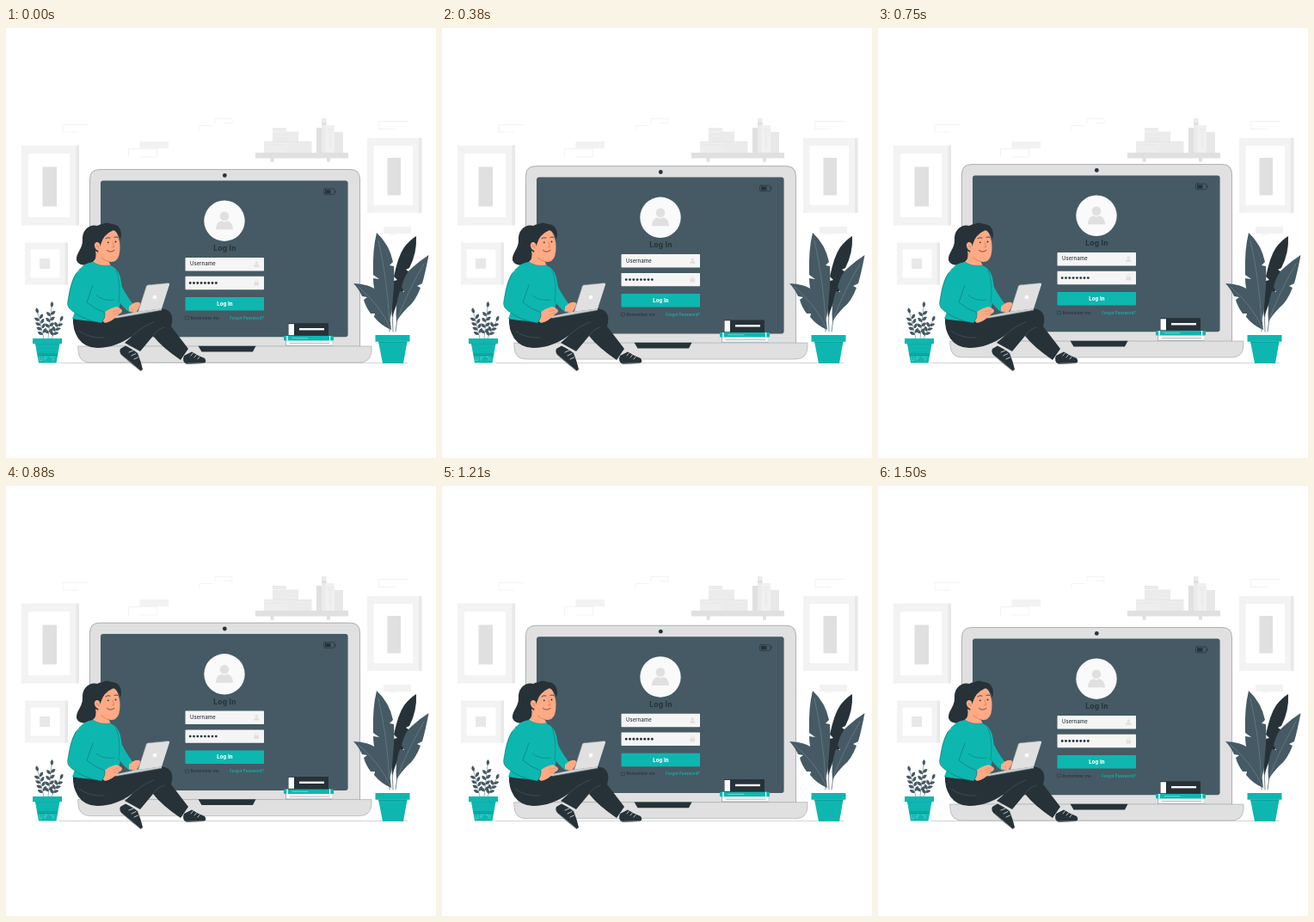
An HTML page with a canvas for the animation above (1.54 s loop, 500 px wide and 500 px high).

```html
<!DOCTYPE html>
<html lang="en">
<head>
<meta charset="utf-8">
<title>Log in</title>
<style>
html, body { margin: 0; width: 100%; height: 100%; overflow: hidden; background: #fff; }
canvas { display: block; width: 500px; height: 500px; }
</style>
</head>
<body>
<canvas id="stage"></canvas>
<script>
const LOOP = 1540, RISE_END = 690, FALL_END = 1510, LIFT = 6;
const TEAL = '#0db7b0', DARK = '#263238', SLATE = '#455a64', SKIN = '#fdaa85';
const GREY = '#e0e0e0', PALE = '#f0f0f0', LIGHT = '#fafafa', FIELD = '#f5f5f5';
const canvas = document.getElementById('stage');
const c = canvas.getContext('2d');
const ratio = window.devicePixelRatio || 1;
canvas.width = canvas.height = 500 * ratio;

function rect(x, y, w, h, color, r = 0) {
  c.beginPath();
  c.roundRect(x, y, w, h, r);
  c.fillStyle = color;
  c.fill();
}

function shape(d, color) {
  c.fillStyle = color;
  c.fill(new Path2D(d));
}

function line(d, color = DARK, width = 0.6) {
  c.strokeStyle = color;
  c.lineWidth = width;
  c.lineCap = c.lineJoin = 'round';
  c.stroke(new Path2D(d));
}

function dot(x, y, r, color) {
  c.beginPath();
  c.arc(x, y, r, 0, Math.PI * 2);
  c.fillStyle = color;
  c.fill();
}

function label(text, x, y, size, color, weight = 500, align = 'left') {
  c.font = `${weight} ${size}px Inter, sans-serif`;
  c.letterSpacing = `${size * 0.03}px`;
  c.textAlign = align;
  c.fillStyle = color;
  c.fillText(text, x, y);
}

// Small pointed leaf growing from (x, y) at the given angle in degrees.
function leaf(x, y, angle, length, color) {
  c.save();
  c.translate(x, y);
  c.rotate(angle * Math.PI / 180);
  shape(`M0 0Q${length * .55} -3.600 ${length} 0Q${length * .45} 3.600 0 0Z`, color);
  c.restore();
}

function pictureFrame(x, y, w, h, inset, art, artColor = GREY) {
  rect(x, y, w, h, '#f3f3f3');
  rect(x + w - 3.5, y, 3.5, h, '#e8e8e8');
  rect(x + inset, y + inset + 1.5, w - 2 * inset - 3, h - 2 * inset - 3, '#fff');
  line(`M${x} ${y}l${inset} ${inset + 1.5}M${x} ${y + h}l${inset} ${-inset - 1.5}`, '#e9e9e9', 0.4);
  rect(...art, artColor);
}

function drawWall() {
  pictureFrame(18, 136.5, 67, 93, 8, [42.5, 161.5, 16.5, 46]);
  pictureFrame(22, 249.5, 50, 49, 6.5, [39, 268, 12, 12], '#e8e8e8');
  pictureFrame(420, 128, 63.5, 87, 7.5, [443.5, 151, 15.5, 43.5]);
  rect(155.5, 132, 33.5, 8, '#f2f2f2');
  rect(439, 231, 32, 8, '#f2f2f2');
  const bricks = 'M95 112.5H66V121h18M142.500 150V140.500h33V150h-20' +
    'M225 119v-5.500h15M243 111v-5.500h20v5h-10M434 117.500v-9h33M434 117.500h18M446 240h8';
  line(bricks, '#e7e7e7', 0.5);

  rect(290, 145, 108, 6.5, GREY);
  rect(307.5, 151, 4, 4.7, GREY);
  rect(373, 151, 4, 4.7, GREY);
  rect(310, 116, 16, 16, '#ebebeb');
  rect(310, 120.5, 30, 11.5, '#ebebeb');
  rect(310, 120, 16, 0.6, '#f7f7f7');
  rect(300, 132, 28, 13, '#ededed');
  rect(328, 132, 27.5, 13, '#ebebeb');
  line('M300.500 132.300H355M303 136h22', '#dedede', 0.5);
  rect(361, 116, 6, 29, GREY);
  rect(367, 105, 5.5, 40, '#ebebeb');
  rect(372.5, 113, 9.5, 32, PALE);
  rect(382, 121, 10, 24, '#e8e8e8');
  rect(367, 110, 5.5, 3, GREY);
  line('M374 118h6M374 121h6M377 125v14', GREY);
  line('M62 389.500H467', '#a8a8a8', 0.5);
}

function person(x, y, s, color) {
  c.save();
  c.translate(x, y);
  c.scale(s, s);
  dot(0, 0, 5.3, color);
  shape('M-10 15.500C-10 9-6 5.500-3 5.500Q0 8 3 5.500C6 5.500 10 9 10 15.500Z', color);
  c.restore();
}

function drawForm() {
  dot(254, 224.2, 23.7, LIGHT);
  person(254, 218.7, 1, GREY);
  label('Log In', 254.5, 259.2, 8.5, DARK, 700, 'center');
  rect(208.5, 267, 91.5, 15.5, FIELD, 0.7);
  rect(208.5, 288.8, 91.5, 15.4, FIELD, 0.7);
  rect(208.5, 313, 91.5, 15.5, TEAL, 0.7);
  label('Username', 214, 276.4, 5.8, DARK);
  for (let i = 0; i < 8; i++) dot(214.2 + i * 4.3, 296.5, 1.4, DARK);
  person(291.3, 273, 0.32, GREY);
  rect(288.5, 295.5, 5.6, 4, GREY, 0.6);
  line('M289.700 295.500v-1a1.600 1.600 0 0 1 3.200 0v1', GREY, 0.7);
  label('Log In', 254.5, 322.8, 5.9, '#fff', 800, 'center');
  line('M208.800 335.200h3.600v3.600h-3.600Z', DARK, 0.5);
  label('Remember me', 214.5, 338.7, 4.6, DARK);
  label('Forgot Password?', 300, 338.7, 4.35, TEAL, 600, 'right');
}

function drawBooks() {
  rect(325.5, 363, 53.5, 6.3, LIGHT);
  line('M325.500 363.500v5.700H379M330 366.500h46', '#6b7880', 0.5);
  rect(323, 358, 58, 5.4, TEAL, 0.8);
  rect(326.3, 358, 1.5, 5.4, '#fff');
  rect(376, 358, 1.2, 5.4, '#fff');
  line('M333 360.700h18', '#b9eae7');
  rect(328, 343.3, 47, 14.5, DARK, 0.6);
  rect(328.5, 344.2, 6.5, 13, LIGHT);
  rect(341, 349, 29, 2.4, LIGHT);
}

function drawLaptop() {
  const lid = 'M97.500 370V176Q97.500 164.500 109 164.500H400Q411.500 164.500 411.500 176V370Z';
  const base = 'M84 370H425V376Q424 389 411 389H98Q85 389 84 376Z';
  shape(lid, GREY);
  line(lid, '#65737b', 0.5);
  rect(110, 177.5, 287.6, 181.8, SLATE, 3);
  dot(254.3, 171.4, 2.4, DARK);
  shape(base, GREY);
  line(base, '#8b969b', 0.5);
  shape('M223.500 369.700H290.500L287 376.500H227.500Z', DARK);
  line('M371 187h9.500a1.500 1.500 0 0 1 1.500 1.500v3.700a1.500 1.500 0 0 1-1.500 1.500h-9.500a1.500 1.500 0 0 1-1.500-1.500v-3.700a1.500 1.500 0 0 1 1.500-1.500Z', DARK, 0.7);
  rect(371, 188.3, 6.5, 4.2, DARK);
  rect(382.4, 189, 0.9, 2.6, DARK);
  drawForm();
  drawBooks();
}

function drawLegs() {
  shape('M133 373L139 369.500Q148 374 153 378Q157 388 159 397L156.500 399Q145 390 135 381Q131 377 133 373Z', DARK);
  shape('M207 381L216 376.500Q223 381 231 384Q234 388 230 390L210 391Q204 388 207 381Z', DARK);
  line('M143 377l5-2M146 381l5-2.500M149 385l4.500-2M215 381l2.500-3M219 383l2.500-3M223 385l2-2.500', '#fff', 0.7);
  line('M135 381Q147 390 156.500 398.700M209 390.300l22-.800', '#d5d9db', 0.5);
  shape('M78 337L114 342Q140 332 166 327Q186 324 191 331Q195 336 192 347L212 373L203 386Q181 371 171 358L156 376L138 366Q144 361 148 357Q128 372 106 372Q92 372 84 361Q77 350 78 337Z', DARK);
  line('M171 358Q176 350 184 348M148 357Q160 346 172 342M85 352Q96 361 114 360', '#56656d', 0.5);
}

function drawHead() {
  shape('M107 230C96 227 88 236 89 247C89 257 81 262 82 270C85 278 97 277 103 270C110 263 110 246 107 230Z', DARK);
  shape('M104 259L118 268L122 277Q112 281 101 274Q106 267 104 259Z', SKIN);
  shape('M106 245Q112 235 127 235Q132 244 132.500 253Q133 267 127 271Q119 274 111 267Q106 263 106 245Z', SKIN);
  shape('M103 250C99 239 102 229 112 228Q117 225 123 228C132 228 136 237 133 246Q131 238 125 235Q113 240 110 252L107 259Q103 257 103 250Z', DARK);
  shape('M109 251C106 247 102 250 103 254C104 258 107 260 110 258Z', SKIN);
  line('M105 253Q107 252 108 256', '#b45f49', 0.5);
  dot(118.8, 249.3, 0.9, DARK);
  dot(127.5, 248.5, 0.9, DARK);
  line('M116 244.700Q118 243 121 244M126 243.300Q128 242.500 130 243.500', DARK, 0.8);
  line('M124 249l1.800 5.500-2.300.400', '#cf684c');
  line('M117.500 258.500Q121 262 126 258.500', DARK, 0.7);
  line('M111 267Q115 271 121 272', '#d9714f', 0.7);
}

function drawWoman() {
  drawLegs();
  drawHead();
  shape('M101 272Q109 278 121 276Q130 279 133 290Q137 305 132 323L131 334Q112 345 77 338L82 325Q72 302 86 280Q92 273 101 272Z', TEAL);
  shape('M131 292Q136 306 149 323L144 331Q133 323 127 310Z', TEAL);
  shape('M143 324Q149 318 155 319L157 322Q154 327 151 331Q146 331 143 329Z', SKIN);
  shape('M163 300.500Q163.500 299 165 298.800L188.500 296.500Q190.500 296.500 190 298.500L181 326.500L153.500 330Z', GREY);
  line('M153.500 330L163 300.500Q163.500 299 165 298.800L188.500 296.500', '#727d83');
  dot(173, 313, 2.3, '#fff');
  shape('M126 335.500L154 329.500L181 326.300V328.300L128 337.500Z', '#c9cdcf');
  line('M128 337.500L181 328.300', SLATE);
  shape('M113 332Q121 325 129 324L134 327Q137 330 131 333Q123 342 115 343L110 338Z', SKIN);
  line('M124 330l8-2M125 333l7-2', '#cf7050', 0.4);
  shape('M84 283Q76 288 72 317Q70 324 77 329Q92 341 111 343Q116 337 115 331Q103 327 94 319L101 300Q104 287 95 281Z', TEAL);
  line('M101 299L94 319Q103 327 115 331Q116 337 111 343Q91 340 77 329Q70 324 72 317Q76 289 86 280', '#176d6c');
  line('M101 272Q109 278 121 276M128 282Q134 296 131 319M105 311Q113 318 126 316', '#176d6c', 0.5);
}

function drawRightPlant() {
  line('M446 353L445 335M450 353Q449 340 450 330M453 353L455 338', SLATE, 0.7);
  shape('M477 242Q478 262 469 279L465 281L468 283Q466 300 458 313Q452 326 449 337Q446 310 451 294L455 293L451 289Q456 265 463 255Q470 246 477 242Z', DARK);
  shape('M491.500 264Q488 283 484 297L478 300L482 302Q476 318 467 325Q458 334 454 342Q452 322 458 306L463 307L460 301Q464 285 472 279Q482 270 491.500 264Z', SLATE);
  shape('M431 238Q446 252 450 272L446 276L451 277Q452 296 450 312Q449 330 446 341Q436 332 432 318L436 316L430 312Q427 300 427 291L434 292L427 287Q426 258 431 238Z', SLATE);
  shape('M404 297Q422 298 430 304L430 308L433 306Q444 318 446 334Q447 342 448 351Q436 346 428 336L429 332L424 332Q418 324 416 316L420 313L414 312Q410 303 404 297Z', SLATE);
  line('M446 341Q443 290 433 247M454 342Q465 310 486 274M448 351Q435 322 410 301', '#82919a', 0.5);
  rect(429.5, 357, 40, 7.7, TEAL);
  shape('M433 364.700H466.500L462 390H438Z', TEAL);
  line('M433.300 365.200H466', '#087f7c');
}

function stem(x, tipX, tipY, pairs) {
  const lean = Math.atan2(tipY - 361, tipX - x) * 180 / Math.PI;
  line(`M${x} 361L${tipX} ${tipY}`, SLATE, 0.5);
  leaf(tipX, tipY, lean, 7, SLATE);
  for (let i = 0; i < pairs; i++) {
    const k = 0.15 + 0.75 * i / pairs;
    const px = x + (tipX - x) * k, py = 361 + (tipY - 361) * k;
    leaf(px, py, lean - 48, 7, SLATE);
    leaf(px, py - 2, lean + 48, 7, SLATE);
  }
}

function drawLeftPlant() {
  stem(44, 37, 332, 4);
  stem(49, 53, 325, 4);
  stem(53, 63, 341, 3);
  rect(31, 361, 34, 6.2, TEAL);
  shape('M34 367.200H62.500L58.500 389.500H38Z', TEAL);
  line('M34.300 367.600H62M36.500 378.800H60M37.200 380.500H59.500', '#087f7c', 0.5);
  line('M39 382.500v4h3v-4M45 386.500v-4h3M45 384.500h2M51 382.500h3v4M56 382.500v4', '#75d6d1');
}

// Quick rise and slower fall, with a slightly broadened crest.
function liftAt(t) {
  const p = t < RISE_END ? t / RISE_END : Math.max(0, (FALL_END - t) / (FALL_END - RISE_END));
  return LIFT * ((1 - Math.cos(Math.PI * p)) / 2) ** 0.8;
}

function render(now) {
  c.setTransform(ratio, 0, 0, ratio, 0, 0);
  rect(0, 0, 500, 500, '#fff');
  drawWall();
  c.save();
  c.translate(0, -liftAt(now % LOOP));
  drawLaptop();
  c.restore();
  drawWoman();
  drawLeftPlant();
  drawRightPlant();
}

const start = performance.now();
function tick() {
  render(performance.now() - start);
  requestAnimationFrame(tick);
}
tick();
</script>
</body>
</html>
```
